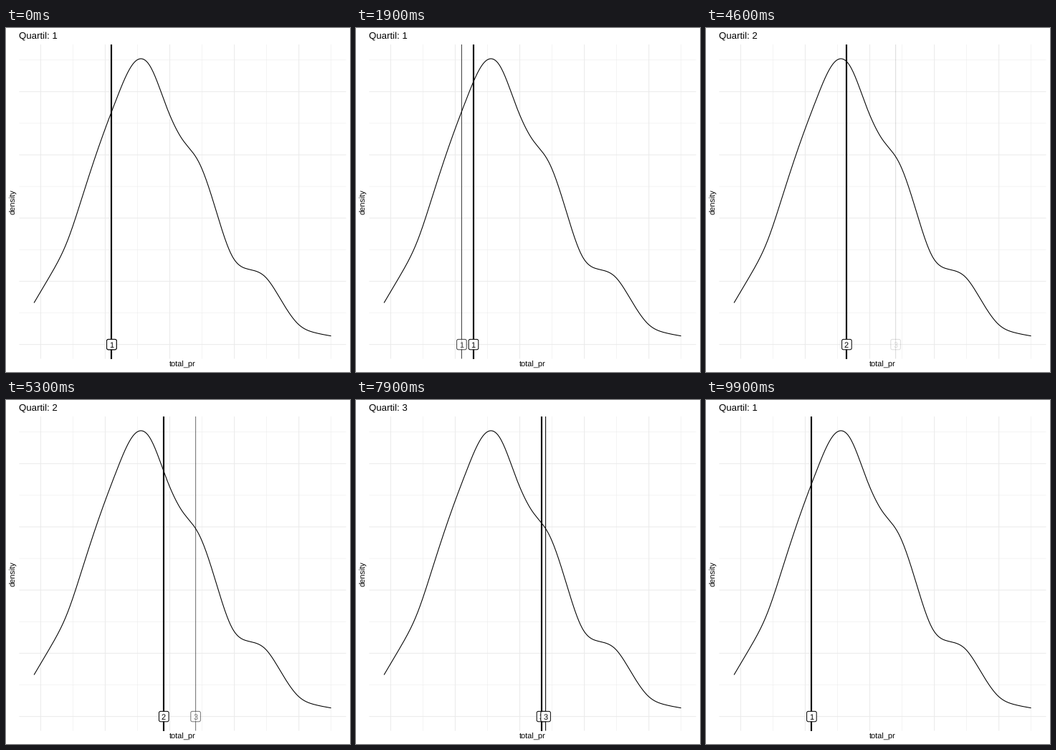
Recreate the animation shown at these times as a matplotlib script. Size 480 by 480 pixels, loop 10 s.

```python
import numpy as np
import matplotlib.pyplot as plt
from matplotlib.animation import FuncAnimation
from matplotlib.patches import FancyBboxPatch

plt.rcParams["font.family"] = "Liberation Sans"
plt.rcParams["text.hinting"] = "no_hinting"

SIZE, DPI = 480, 100
PT = 72 / DPI  # points per pixel
LEFT, RIGHT, TOP, BOTTOM = 18.4, 474.5, 23, 461.5
BASE = 441.6
QUARTILES = {1: 147.4, 2: 193.0, 3: 264.6}
# start frame, end frame, first frame showing the new quartile, from, to
MOVES = [(11, 33, 23, 1, 2), (45, 66, 56, 2, 3), (78, 99, 90, 3, 1)]
# key heights of the density, evenly spaced from X0 to X1
X0, X1 = 39.1, 453.6
HEIGHTS = [383.5, 344.5, 298.5, 230, 160.5, 98.8, 50, 52, 108.3, 155.8,
           187.8, 252.5, 318, 336.6, 347, 380.8, 413, 425, 429.7]


def spline(y, count):
    """Natural cubic spline through evenly spaced heights."""
    y = np.asarray(y, float)
    n = len(y)
    a = 4 * np.eye(n) + np.eye(n, k=1) + np.eye(n, k=-1)
    a[[0, -1]] = np.eye(n)[[0, -1]]
    bend = np.zeros(n)
    bend[1:-1] = np.diff(y, 2)
    m = np.linalg.solve(a, bend)
    u = np.linspace(0, n - 1, count)
    i = np.minimum(u.astype(int), n - 2)
    t = u - i
    s = 1 - t
    return (s * y[i] + t * y[i + 1]
            + (s**3 - s) * m[i] + (t**3 - t) * m[i + 1])


fig = plt.figure(figsize=(SIZE / DPI, SIZE / DPI), dpi=DPI, facecolor="white")
ax = fig.add_axes([0, 0, 1, 1])
ax.set(xlim=(0, SIZE), ylim=(SIZE, 0))
ax.axis("off")


def line(xs, ys, width, color="black", z=2, snap=False):
    return ax.plot(xs, ys, color=color, lw=width * PT, zorder=z, snap=snap,
                   solid_capstyle="butt", solid_joinstyle="round")[0]


def text(x, y, s, size, **kw):
    return ax.text(x, y, s, fontsize=size * PT, va="baseline", **kw)


class Marker:
    """Vertical line with a boxed digit at its foot."""

    def __init__(self, n, width, z, snap=False):
        self.line = line([0, 0], [TOP, BOTTOM], width, z=z, snap=snap)
        self.box = FancyBboxPatch(
            (0, BASE - 7.2), 13.6, 14.4, fc="white", ec="black", lw=PT,
            boxstyle="round,pad=0,rounding_size=2.2", zorder=z + 2, snap=False)
        ax.add_patch(self.box)
        self.digit = text(0, BASE + 4, str(n), 11, ha="center", zorder=z + 2.1)
        self.move(QUARTILES[n])

    def move(self, x):
        self.line.set_xdata([x, x])
        self.box.set_x(x - 6.8)
        self.digit.set_x(x - 0.4)

    def fade(self, alpha):
        for part in (self.line, self.box, self.digit):
            part.set_alpha(alpha)
            part.set_visible(alpha > 0)


for k in range(10):
    width = 0.53 if k % 2 else 1.07
    gx, gy = 48.4 + 45.035 * k, BASE - 44.1 * k
    line([gx, gx], [TOP, BOTTOM], width, "#ebebeb", 1 - k % 2 * 0.1)
    line([LEFT, RIGHT], [gy, gy], width, "#ebebeb", 1 - k % 2 * 0.1)

line(np.linspace(X0, X1, 512), spline(HEIGHTS, 512), 1.07)
text(246.5, 472.7, "total_pr", 11, ha="center")
text(13.2, 242.3, "density", 11, ha="center", rotation=90,
     rotation_mode="anchor")

title = text(18.4, 15, "", 13.2)
current = Marker(1, 2.13, 4, snap=True)
ghosts = {n: Marker(n, 1.07, 4.5) for n in (1, 3)}


def state(f):
    """Shown quartile, marker position and opacity of each ghost."""
    shown, x, alpha = 1, QUARTILES[1], {1: 1.0, 3: 0.0}
    for start, end, switch, a, b in MOVES:
        if f <= start:
            break
        p = min((f - start) / (end - start), 1)
        x = QUARTILES[a] + p * (QUARTILES[b] - QUARTILES[a])
        shown = b if f >= switch else a
        alpha = {1: 0.0, 3: 0.0}
        if a in alpha:
            alpha[a] = (1 - p) ** 0.65
        if b == 3:
            alpha[3] = p ** 0.65
    return shown, x, alpha


def update(f):
    shown, x, alpha = state(f)
    title.set_text(f"Quartil: {shown}")
    current.digit.set_text(str(shown))
    current.move(x)
    for n, ghost in ghosts.items():
        ghost.fade(alpha[n])
    return []


anim = FuncAnimation(fig, update, frames=100, interval=100, repeat=True,
                     repeat_delay=0, init_func=lambda: update(0))
plt.show()
```
